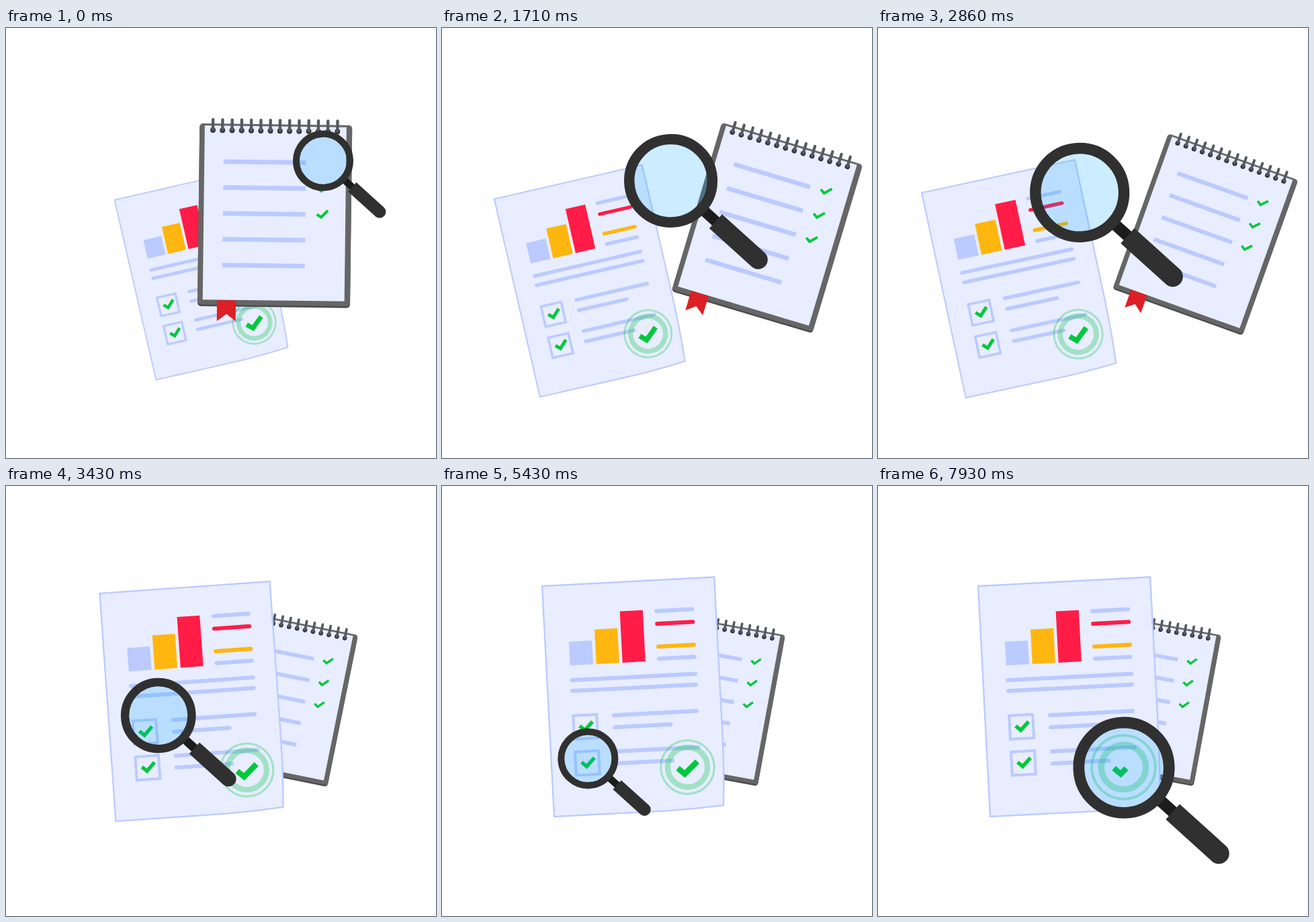
These frames come from a looping animation (640 px wide and 640 px high, 8000 ms). An HTML page:

```html
<!DOCTYPE html>
<html lang="en">
<head>
<meta charset="utf-8">
<title>Document review</title>
<style>
  html, body { margin: 0; width: 100%; height: 100%; overflow: hidden; background: #fff; }
  svg { display: block; width: 100%; height: 100%; }
  .line { stroke: #bbcaff; fill: none; }
  .round { stroke-width: 6; stroke-linecap: round; }
  .tick { stroke: #00c83c; fill: none; }
</style>
</head>
<body>
<svg id="stage" viewBox="0 0 640 640">
  <g id="paper">
    <path d="M0 0H256.5V220Q256.5 290 252.6 339.8Q212 342.8 170 343.8L0 343.5Z" fill="#e8edff" stroke="#bbcaff" stroke-width="2.3"/>
    <g id="print"></g>
    <g transform="translate(202.1 280.4)" fill="none" stroke="#00c341" stroke-opacity=".3">
      <circle id="outerRing" r="39.8" stroke-width="3.2"/>
      <circle id="innerRing" r="29.6" stroke-width="8.4"/>
    </g>
    <path id="stampTick" class="tick" stroke-width="8.5" d="M187.5 281.2L197.4 290.2L217 272.7"/>
  </g>
  <g id="pad">
    <rect y="-268" width="227" height="270" rx="5" fill="#4b4b4b"/>
    <rect y="-270" width="227" height="269.5" rx="5" fill="#666"/>
    <rect x="7.6" y="-267" width="211" height="259.2" fill="#e8edff"/>
    <g id="padLines"></g>
    <g id="spiral"></g>
    <path d="M28.9 -7.2H57V23.7L43.2 13L29.1 24Z" fill="#dd1f26"/>
  </g>
  <g id="lens">
    <path d="M42 0H60" stroke="#1c1c1c" stroke-width="10.5"/>
    <path d="M58.3 -9.2H113.4A9.2 9.2 0 0 1 113.4 9.2H58.3Z" fill="#303030"/>
    <circle r="36" fill="#00a0ff" fill-opacity=".2"/>
    <circle r="40" fill="none" stroke="#303030" stroke-width="10"/>
  </g>
</svg>
<script>
const LOOP = 8000, MOVE = 920, DRAW = 480;
// Moments at which each big movement begins
const SPREAD = 1054, GATHER = 2695, NEXT_BOX = 4680, TO_STAMP = 6708;
const BLUE = '#bbcaff', YELLOW = '#ffb60f', RED = '#ff1d48';
const $ = id => document.getElementById(id);

function add(parent, tag, attrs) {
  const node = document.createElementNS('http://www.w3.org/2000/svg', tag);
  for (const key in attrs) node.setAttribute(key, attrs[key]);
  $(parent).appendChild(node);
  return node;
}

// Bar chart standing on a common base line
[BLUE, YELLOW, RED].forEach((fill, i) => {
  const height = 35.2 + 12 * i + 4.3 * i * i;
  add('print', 'rect', { x: 35.5 + 39 * i, y: 120 - height, width: 34.2, height, fill });
});

function textLine(x, y, width, stroke = BLUE) {
  add('print', 'path', { d: `M${x} ${y}h${width}`, class: 'round', stroke });
}

for (let i = 0; i < 2; i++) {
  textLine(168, 46 + 71 * i, 53);
  textLine(168, 65 + 34 * i, 53, i ? YELLOW : RED);
  textLine(37, 142.2 + 16 * i, 184);
}

const boxTicks = [0, 54].map(dy => {
  textLine(96.8, 197.5 + dy, 123);
  textLine(96.8, 215.4 + dy, 83.6);
  add('print', 'rect', { x: 36, y: 195 + dy, width: 35, height: 35, class: 'line', 'stroke-width': 4 });
  return add('print', 'path', { d: `M45 ${210.7 + dy}l7.2 6.8l12.2 -12.3`, class: 'tick', 'stroke-width': 5.5 });
});

for (let i = 0; i < 5; i++)
  add('padLines', 'path', { d: `M36.2 ${-213.6 + 38.5 * i}H159`, class: 'line', 'stroke-width': 6.8 });

const padTicks = [0, 1, 2].map(i => add('padLines', 'path', {
  d: `M176 ${-214.9 + 39 * i}l6.4 4.4l9.9 -10.1`, class: 'tick', 'stroke-width': 4
}));

for (let i = 0; i < 14; i++) {
  const x = 19.8 + 14.26 * i;
  add('spiral', 'circle', { cx: x, cy: -260.2, r: 4, fill: '#35363a' });
  add('spiral', 'path', { d: `M${x} -276V-261`, stroke: '#545b63', 'stroke-width': 4.4, 'stroke-linecap': 'round' });
}

const clamp = p => Math.max(0, Math.min(1, p));
const mix = (a, b, p) => a + (b - a) * p;

// Eased progress of a movement
function move(t, start, length = MOVE) {
  const p = clamp((t - start) / length);
  return p * p * (3 - 2 * p);
}

// Passes through the poses one after another
function blend(poses, steps) {
  return poses.slice(1).reduce((pose, next, i) => {
    const mixed = {};
    for (const key in pose) mixed[key] = mix(pose[key], next[key], steps[i]);
    return mixed;
  }, poses[0]);
}

const paperPoses = [
  { x: 161.5, y: 256, turn: -13 },
  { x: 57.1, y: 254.2, turn: -13 },
  { x: 149, y: 149, turn: -3 }
];
const padPoses = [
  { x: 285, y: 412, turn: .7 },
  { x: 356.2, y: 384.5, turn: 20.6 },
  { x: 282.4, y: 410.6, turn: 10.4 }
];
const lensPoses = [
  { x: 472, y: 197.6 },
  { x: 308, y: 234.7 },
  { x: 217.3, y: 354 },
  { x: 217.3, y: 410.7 },
  { x: 366, y: 419.2 }
];

function place(id, { x, y, turn = 42.1 }, size) {
  $(id).setAttribute('transform', `translate(${x} ${y}) rotate(${turn}) scale(${size})`);
}

// A tick is whole until the lens arrives, then it is drawn again
const ticks = [
  [padTicks[0], 0],
  [boxTicks[0], GATHER + MOVE],
  [boxTicks[1], NEXT_BOX + MOVE],
  [$('stampTick'), TO_STAMP + MOVE]
];
ticks.forEach(([path]) => path.setAttribute('pathLength', 1));

let padInFront = true;
function stack(front) {
  if (front === padInFront) return;
  padInFront = front;
  $('stage').insertBefore($(front ? 'pad' : 'paper'), $('lens'));
}

function render(t) {
  const steps = [SPREAD, GATHER, NEXT_BOX, TO_STAMP].map(start => move(t, start));
  const [spread, gather, , toStamp] = steps;
  stack(t < 2330);
  place('paper', blend(paperPoses, steps), .8 + .1 * (spread + gather));
  place('pad', blend(padPoses, steps), 1 - .09 * move(t, 1450, 600) - .07 * gather);
  place('lens', blend(lensPoses, steps), 1 + .68 * (spread - move(t, GATHER, 1230) + toStamp));

  const pulse = move(t, TO_STAMP + MOVE, 300);
  $('outerRing').setAttribute('transform', `scale(${1 + .19 * pulse})`);
  $('innerRing').setAttribute('transform', `scale(${1 + .12 * pulse})`);

  for (const [path, start] of ticks) {
    const shown = t < start ? 1 : clamp((t - start) / DRAW);
    path.setAttribute('stroke-dasharray', `${shown} 2`);
  }
}

const begin = performance.now();
function frame() {
  render((performance.now() - begin) % LOOP);
  requestAnimationFrame(frame);
}
frame();
</script>
</body>
</html>
```
